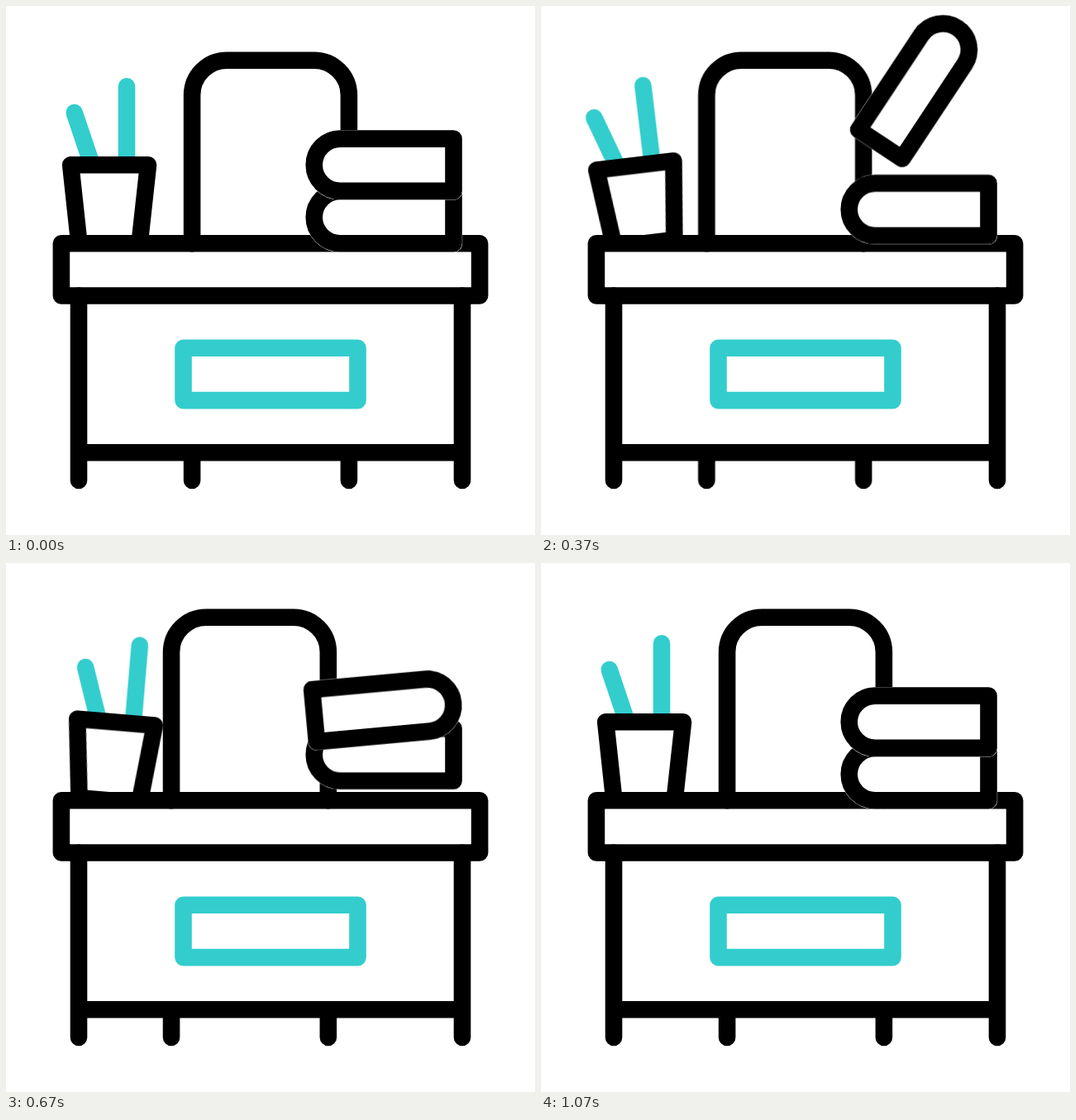
Recreate the animation shown at these times as an HTML page without scripts. Size 640 by 640 pixels, loop 1670 ms.

```html
<!DOCTYPE html>
<html lang="en">
<head>
<meta charset="utf-8">
<title>Desk</title>
<style>
  html, body { margin: 0; width: 100%; height: 100%; overflow: hidden; background: #fff; }
  svg { display: block; width: 100vw; height: 100vh; }
  .ink {
    fill: none; stroke: #000; stroke-width: 20.6;
    stroke-linecap: round; stroke-linejoin: round;
  }
  .teal { stroke: #33cdcd; }
  .solid { fill: #fff; }
  .halo { stroke: #fff; stroke-width: 21.3; }

  .chair, .cup, .low, .lift, .spin {
    animation: 1670ms infinite cubic-bezier(.333, 0, .667, 1);
  }
  .chair { animation-name: slide; }
  .cup { animation-name: tilt; transform-origin: 125px 287.2px; }
  .low { animation-name: hop; }
  .lift { animation-name: toss; }
  .spin { animation-name: flip; transform-origin: 457.1px 192.3px; }

  @keyframes slide {
    0%, 9.78%, 52.1%, 100% { transform: translateX(0); }
    31.24%, 31.74% { transform: translateX(-40px); }
  }
  @keyframes tilt {
    0%, 16.03%, 48.3%, 100% { transform: rotate(0deg); }
    29.94%, 30.44% { transform: rotate(-16.3deg); }
    38.52% { transform: rotate(5.2deg); }
  }
  @keyframes hop {
    0%, 25.67%, 57.6%, 100% { transform: translateY(0); }
    1.34%, 33.27% { transform: translateY(0); animation-timing-function: cubic-bezier(.5, 0, .75, 1); }
    13.29%, 45.23% { transform: translateY(-49.8px); }
  }
  @keyframes toss {
    0%, 33.33%, 63.87%, 100% { transform: translateY(0); }
    1.4%, 33.93% { transform: translateY(0); animation-timing-function: cubic-bezier(.6, 0, .64, 1); }
    21.92%, 51.1% { transform: translateY(-95.5px); animation-timing-function: cubic-bezier(.55, 0, .82, .5); }
  }
  @keyframes flip {
    0%, 4.05%, 61.74%, 100% { transform: rotate(0deg); }
    33.03% { transform: rotate(180deg); }
    36.93% { transform: rotate(180deg); animation-timing-function: cubic-bezier(.45, 0, .667, 1); }
  }
</style>
</head>
<body>
<svg viewBox="0 0 640 640">
  <defs>
    <path id="book" d="M541.5 160.6H404.4a31.65 31.65 0 0 0 0 63.3H541.5z"/>
  </defs>

  <g class="cup ink">
    <path class="teal" d="M82.7 129L102.2 187M146 97.4V187"/>
    <path d="M78.2 192.3H172L161.6 287.2H88.4z"/>
  </g>

  <g class="ink">
    <path class="solid" d="M66.9 287.2H573.1V350.5H66.9z"/>
    <path d="M88 350.5V574M552 350.5V574M88 540.3H552"/>
    <path class="teal" d="M214.5 413.8H425.5V477.1H214.5z"/>
  </g>

  <g class="chair ink">
    <path d="M225.1 287.2V107.9a42.2 42.2 0 0 1 42.2 -42.2H372.7a42.2 42.2 0 0 1 42.2 42.2V287.2"/>
    <path d="M225.1 540.3V574M414.9 540.3V574"/>
  </g>

  <g class="low ink">
    <use href="#book" y="63.3" class="halo"/>
    <use href="#book" y="63.3" class="solid"/>
  </g>

  <g class="lift ink">
    <g class="spin">
      <use href="#book" class="halo"/>
      <use href="#book" class="solid"/>
    </g>
  </g>
</svg>
</body>
</html>
```
